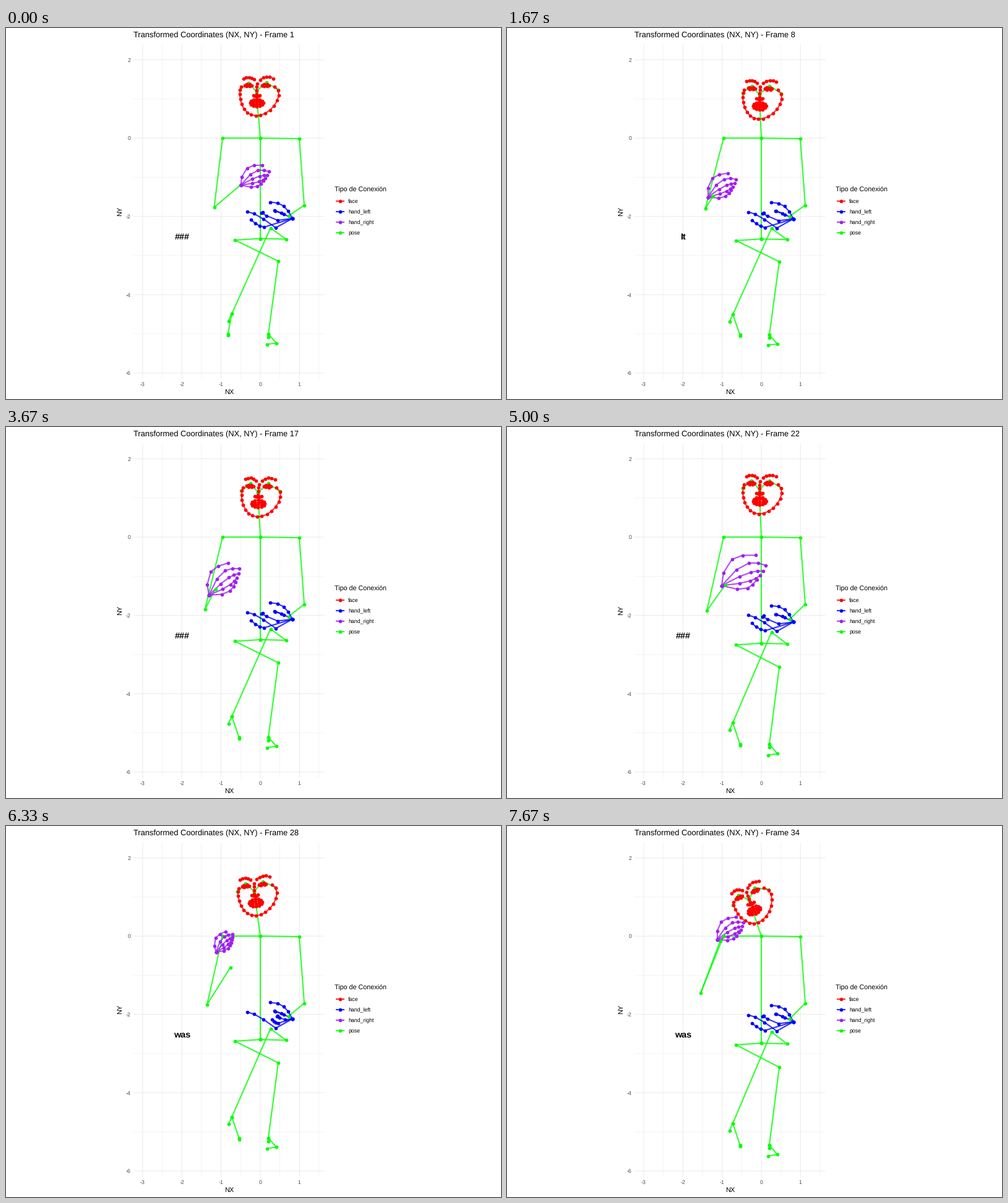
Animation, 800 px wide and 600 px high, one loop 8000 ms. Source, as a matplotlib script:

```python
import numpy as np
import matplotlib.pyplot as plt
from matplotlib.animation import FuncAnimation
from matplotlib.collections import LineCollection

FRAMES, INTERVAL = 160, 50
PT = 0.72  # points per pixel at 100 dpi
UNIT = 63.3
ORIGIN = np.array([410.9, 178.1])
COLORS = {"pose": "#00ff00", "face": "#ff0000",
          "hand_left": "#0000ff", "hand_right": "#a020f0"}

plt.rcParams["font.family"] = "Liberation Sans"
plt.rcParams["text.hinting"] = "none"

# ---------------------------------------------------------------- motion
# Only a few things move by themselves; the rest of the figure follows them.
KEYS = [0, 5, 8, 11, 15, 19, 23]
TRACKS = {
    "head_x": [405.5, 409, 409, 408.5, 408.7, 401, 388],
    "head_y": [92.5, 97.8, 98, 95.7, 91, 95.7, 110],
    "tilt": [0, -1, -1, -1, 0, 6, 24],
    "elbow_x": [336.5, 320.5, 322.5, 321.5, 323, 325, 313],
    "elbow_y": [290, 292, 293.5, 295, 297, 288.5, 270],
    "wrist_x": [379, 333, 329.5, 338.5, 353, 362.5, 344.5],
    "wrist_y": [254, 272, 270, 262, 255, 229, 186],
    "palm_x": [379.5, 324.5, 320, 328, 347, 339.5, 339.5],
    "palm_y": [254, 273.5, 285, 272, 256.5, 204, 183.5],
    "aim": [18, 25, 40, 34, 17, 40, 25],
    "span": [45, 48, 55, 58, 70, 35, 45],
    "fold": [0, 0, 0.5, 0, 0, 0.5, 0],
    "toe": [511.5, 513, 509.5, 518.5, 530.5, 521.5, 533.5],
    "foot_x": [358.5] + [376.5] * 6,
}

# ---------------------------------------------------------------- rest shapes
LEGS = {"mid": (411, 340.5), "hip_r": (370, 343), "hip_l": (452.5, 341.5),
        "knee_r": (440, 377), "knee_l": (427.5, 323.5),
        "ankle_r": (424, 495), "ankle_l": (365, 462),
        "heel_r": (424, 500), "toe_r": (437, 509.5), "small_r": (421.5, 511.5),
        "heel_l": (359.5, 473.5), "wrist_l": (456.5, 304)}
BODY = {"neck": (411, 178), "shoulder_r": (350, 178),
        "shoulder_l": (474, 179), "elbow_l": (482, 286.5)}
# relative to the point between the eyes
HEAD = {"nose": (-1, 10), "eye_r": (-13.5, -4), "eye_l": (15, -4.5),
        "ear_r": (-28, 7.5), "ear_l": (34.5, 7.5)}
BONES = ["nose neck mid", "wrist_r elbow_r shoulder_r neck shoulder_l elbow_l wrist_l",
         "mid hip_r knee_r ankle_r toe_r small_r", "ankle_r heel_r",
         "mid hip_l knee_l ankle_l toe_l small_l", "ankle_l heel_l",
         "ear_r eye_r nose eye_l ear_l"]

# knuckle, middle and tip of each finger, relative to the resting left palm
PALM = np.array([463, 308])
REST_FINGERS = [[(-7, -12), (-19, -23), (-36, -26.5)],
                [(-14, -7), (-30, -13), (-18, -9)],
                [(-24, 3), (-47, -7), (-48, -10)],
                [(-27, 15), (-55, -4), (-73, -11)],
                [(-46, 14), (-57, 10), (-67, 2)]]


def arc(points, n):
    """n points on the polynomial through evenly spaced control points."""
    k = len(points)
    coef = np.polyfit(np.linspace(0, 1, k), np.array(points), k - 1)
    return np.vander(np.linspace(0, 1, n), k) @ coef


def polar(radii, degrees):
    a = np.radians(degrees)
    return np.column_stack([radii * np.cos(a), -radii * np.sin(a)])


def loop(n, center, rx, ry):
    return center + polar(1, np.linspace(180, 540, n + 1)) * (rx, ry)


def rest_face():
    chains = [arc([(-25.5, 2.5), (-24.5, 31), (-2, 49.5), (28, 33), (29, 2)], 17),
              arc([(-22, -11), (-13, -13), (-5, -9)], 5),
              arc([(5, -9), (15.5, -13.5), (26, -11)], 5),
              arc([(0, -3), (-1, 14)], 4),
              arc([(-6, 16), (-0.5, 17.5), (4.5, 16)], 5)]
    for x in (-14, 14):
        chains += [loop(6, (x, 0), 5.5, 1.8), np.array([[x, 0]])]
    mouth = (-0.5, 28.5)
    return chains + [loop(12, mouth, 10.5, 6), loop(8, mouth, 7.5, 2.2)]


FACE = rest_face()


def right_hand(palm, aim, span):
    """Fingers fan out at the knuckles and close up towards the tips."""
    reach = span * np.array([0.45, 0.73, 0.88, 1])
    fingers = [polar(span * np.array([0.3, 0.65, 0.85, 1.05]),
                     aim + np.linspace(65, 25, 4))]
    for k in range(4):
        bend = (1.5 - k) * np.linspace(20, 5, 4)
        fingers.append(polar(reach * (1.12 - 0.1 * k), aim + bend))
    return [np.vstack([palm, palm + f]) for f in fingers]


def left_hand(palm, fold):
    chains = []
    for k, points in enumerate(REST_FINGERS):
        grip = 1 - fold if k in (2, 4) else 1
        chains.append(np.vstack([palm, palm + grip * arc(points, 4)]))
    return chains


def figure_chains(step):
    m = {name: np.interp(step, KEYS, values) for name, values in TRACKS.items()}
    stretch = (m["toe"] - ORIGIN[1]) / (LEGS["small_r"][1] - ORIGIN[1])

    def lower(p):
        return np.array([p[0], ORIGIN[1] + (p[1] - ORIGIN[1]) * stretch])

    c, s = np.cos(np.radians(m["tilt"])), np.sin(np.radians(m["tilt"]))
    turn = np.array([[c, -s], [s, c]])

    def on_head(p):
        return np.array([m["head_x"], m["head_y"]]) + np.array(p) @ turn

    joint = dict(BODY)
    joint.update({name: lower(p) for name, p in LEGS.items()})
    joint.update({name: on_head(p) for name, p in HEAD.items()})
    joint.update(elbow_r=(m["elbow_x"], m["elbow_y"]),
                 wrist_r=(m["wrist_x"], m["wrist_y"]),
                 toe_l=lower((m["foot_x"], 495)),
                 small_l=lower((m["foot_x"], 497)))
    return {
        "pose": [np.array([joint[n] for n in bone.split()]) for bone in BONES],
        "face": [on_head(chain) for chain in FACE],
        "hand_left": left_hand(lower(PALM), m["fold"]),
        "hand_right": right_hand((m["palm_x"], m["palm_y"]), m["aim"], m["span"]),
    }


# ---------------------------------------------------------------- stage
fig = plt.figure(figsize=(8, 6), dpi=100, facecolor="white")
ax = fig.add_axes([0, 0, 1, 1])
ax.set(xlim=(0, 800), ylim=(600, 0))
ax.axis("off")


def label(x, y, text, px, **kw):
    return ax.text(x, y, text, fontsize=px * PT, va="baseline", **kw)


def line(xs, ys, px, **kw):
    ax.plot(xs, ys, lw=px * PT, solid_capstyle="butt", **kw)


def grid(x=None, y=None, px=1.07):
    xs, ys = ([x, x], [27, 567.5]) if y is None else ([206, 514.5], [y, y])
    line(xs, ys, px, color="#ebebeb", zorder=1, snap=False)


for v in np.arange(-2.5, 2):
    grid(x=ORIGIN[0] + v * UNIT, px=0.53)
for v in (1, -1, -3, -5):
    grid(y=ORIGIN[1] - v * UNIT, px=0.53)
for v in range(-3, 2):
    x = ORIGIN[0] + v * UNIT
    grid(x=x)
    label(x, 579, str(v), 8.8, ha="center", color="#4d4d4d")
for v in (2, 0, -2, -4, -6):
    y = ORIGIN[1] - v * UNIT
    grid(y=y)
    label(201.5, y + 3.3, str(v), 8.8, ha="right", color="#4d4d4d")

label(360.5, 592, "NX", 11, ha="center")
ax.text(184.5, 296.5, "NY", fontsize=11 * PT, rotation=90, ha="center", va="center")
label(531, 264, "Tipo de Conexión", 10.8)

DOT = dict(ls="none", marker="o", ms=5.7 * PT, mew=0)
for n, name in enumerate(sorted(COLORS)):
    y = 279.5 + 17.28 * n
    line([532.8, 546.5], [y, y], 2.13, color=COLORS[name], alpha=0.8)
    ax.plot([539.6], [y], color=COLORS[name], **DOT)
    label(553, y + 3.2, name, 8.8)

title = label(206, 15, "", 12.95)
word = label(284.3, 342, "", 14.4, ha="center", weight="bold", zorder=5)

bones, joints = {}, {}
for name, color in COLORS.items():
    bones[name] = ax.add_collection(LineCollection(
        [], colors=color, alpha=0.8, linewidths=2.13 * PT, capstyle="butt", zorder=3))
    joints[name], = ax.plot([], [], color=color, zorder=4, **DOT)


def spoken(step):
    if step >= 18:
        return "was"
    return "It" if 1 <= step <= 8 else "###"


def update(i):
    step = (3 * i + 2) // 20  # the pose is held, three new ones a second
    title.set_text(f"Transformed Coordinates (NX, NY) - Frame {1 + round(step * 10 / 7)}")
    word.set_text(spoken(step))
    for name, chains in figure_chains(step).items():
        bones[name].set_segments([s for c in chains for s in zip(c[:-1], c[1:])])
        joints[name].set_data(*np.vstack(chains).T)
    return [title, word, *bones.values(), *joints.values()]


anim = FuncAnimation(fig, update, frames=FRAMES, interval=INTERVAL,
                     repeat=True, repeat_delay=0, blit=False)
plt.show()
```
